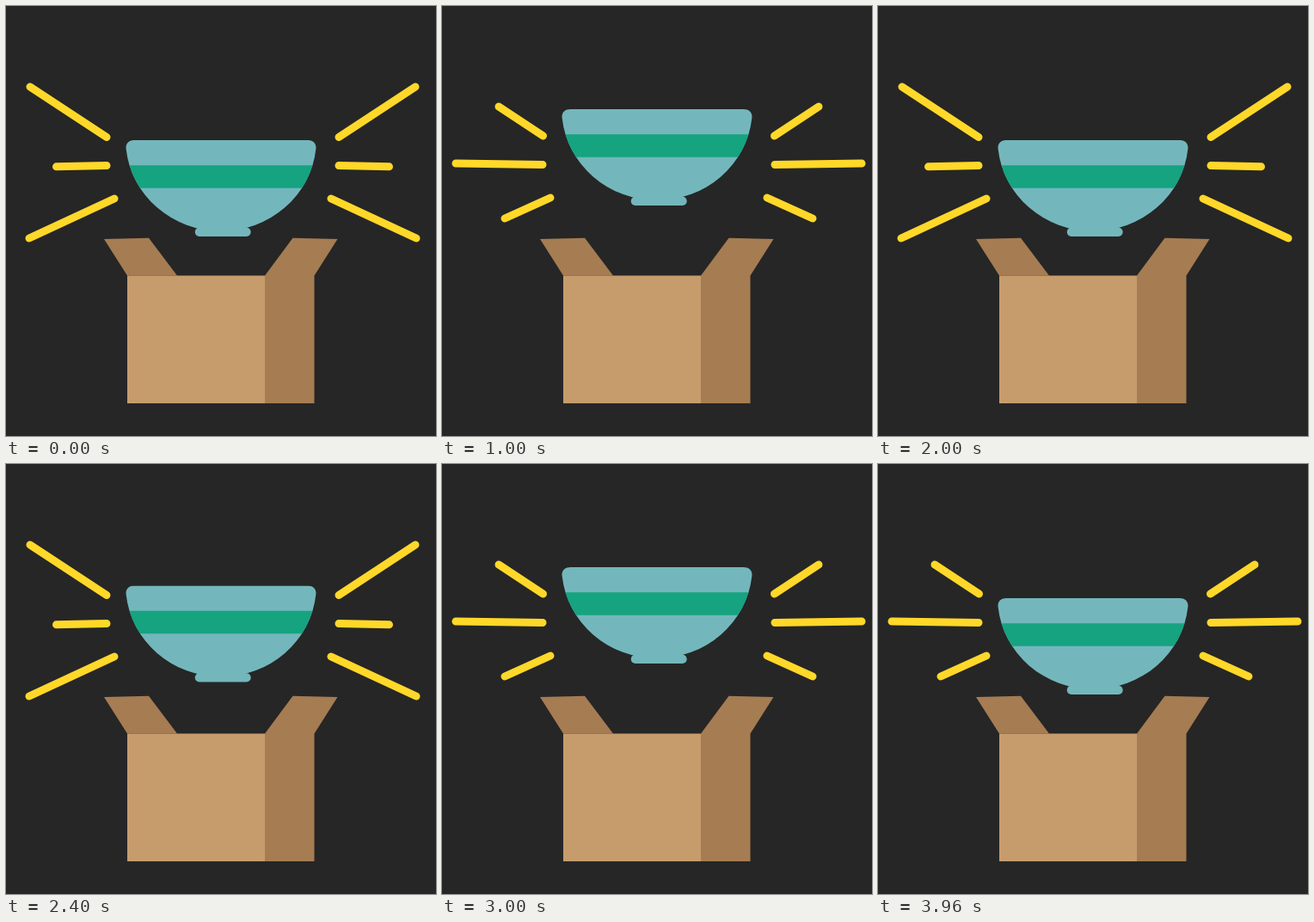
Animation, 500 px wide and 500 px high, one loop 4 s. Source, as an HTML page:

```html
<!DOCTYPE html>
<html lang="en">
<head>
<meta charset="utf-8">
<title>Bowl rising from a box</title>
<style>
  html, body { margin: 0; width: 100%; height: 100%; overflow: hidden; background: #262626; }
  svg { display: block; width: 100%; height: 100%; }
  .rays { fill: none; stroke: #ffd829; stroke-width: 9; stroke-linecap: round; }
</style>
</head>
<body>
<svg viewBox="0 0 500 500">
  <defs>
    <path id="body" d="M149.5 156H350.5C357 156 361.2 160 360.4 166A111 107 0 0 1 139.6 166C138.8 160 143 156 149.5 156Z"/>
    <clipPath id="inside"><use href="#body"/></clipPath>
  </defs>

  <path id="left" class="rays"/>
  <path id="right" class="rays" transform="matrix(-1 0 0 1 504 0)"/>

  <path fill="#a67c52" d="M114 271L166 269.7L199 313.5H141ZM333.5 269.7L385.5 271L358.5 313.5V462H301V313.5Z"/>
  <path fill="#c69c6d" d="M141 313.5H301V462H141Z"/>

  <g id="bowl">
    <!-- The body stops at the top of the foot -->
    <path fill="#73b7bc" clip-path="url(#inside)" d="M130 150H370V259H130Z"/>
    <path fill="#16a37f" clip-path="url(#inside)" d="M130 185.3H370V211.8H130Z"/>
    <rect fill="#73b7bc" x="219.7" y="257.7" width="65" height="10.3" rx="5.1"/>
  </g>
</svg>
<script>
  const LOOP = 4000;
  const RISE = 36;
  // [time in ms, height as a share of RISE]
  const bowlKeys = [[0, 0], [1000, 1], [2000, 0], [3000, 1], [3960, 0], [4000, 0]];
  const rayPoses = [
    "M28 94L117 152.5M58.5 186.8L117 185.6M27 270L126 224",
    "M66 117L117.5 151M16 183L117 184.5M73 247L126 223"
  ];
  const [bowl, left, right] = ["bowl", "left", "right"].map(id => document.getElementById(id));

  function bowlHeight(time) {
    const next = bowlKeys.findIndex(([end]) => time < end);
    const [t0, h0] = bowlKeys[next - 1];
    const [t1, h1] = bowlKeys[next];
    return RISE * (h0 + (h1 - h0) * (time - t0) / (t1 - t0));
  }

  function draw() {
    const time = performance.now() % LOOP;
    const rays = rayPoses[Math.floor(time / 1000) % 2];
    left.setAttribute("d", rays);
    right.setAttribute("d", rays);
    bowl.setAttribute("transform", `translate(0 ${-bowlHeight(time)})`);
    requestAnimationFrame(draw);
  }
  draw();
</script>
</body>
</html>
```
